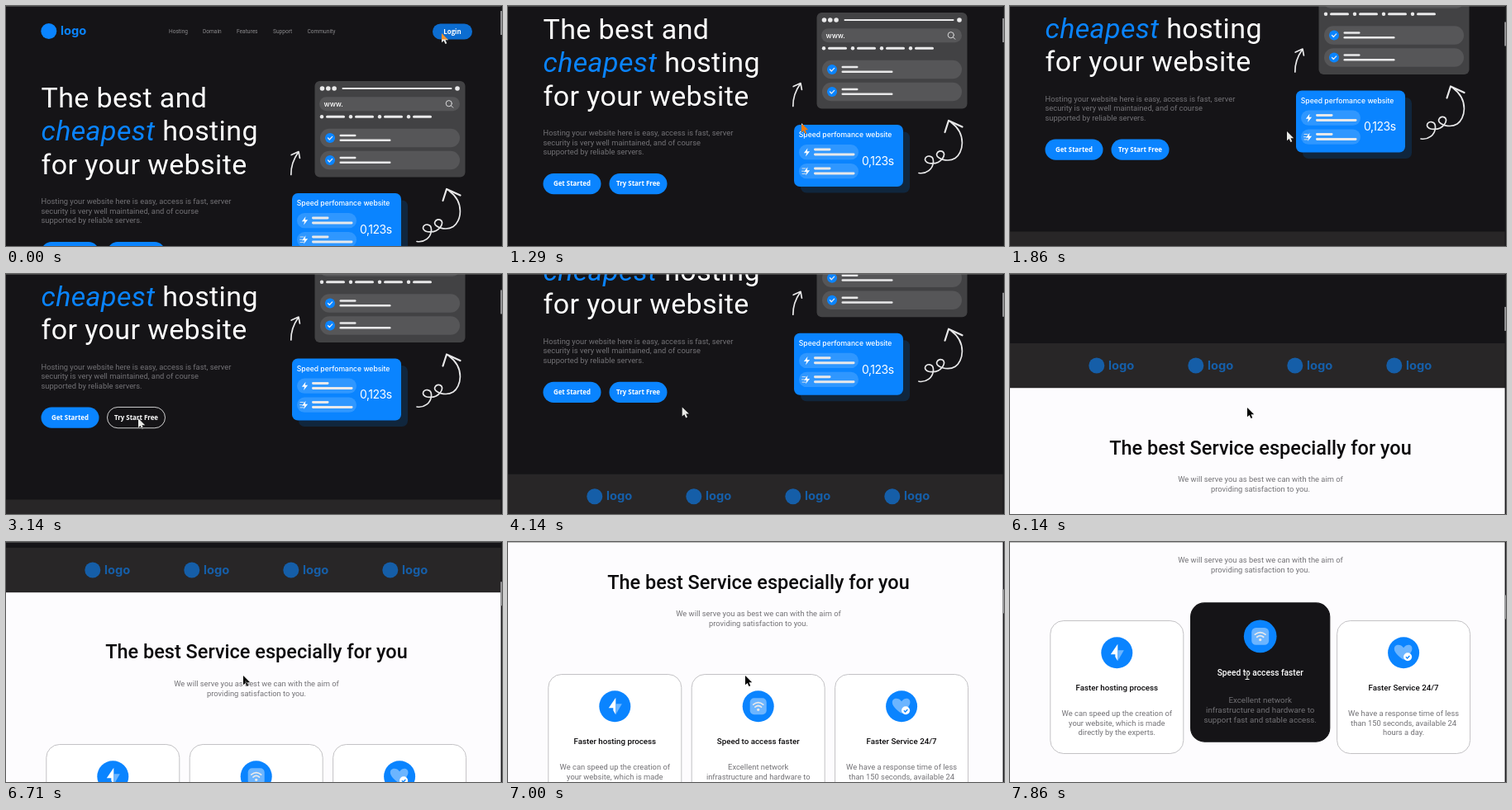
Write an HTML page that moves like this. It is 600x291 px and loops after 8000 ms.

```html
<!DOCTYPE html>
<html lang="en">
<head>
<meta charset="utf-8">
<title>Hosting landing page</title>
<style>
  html, body { margin: 0; width: 100%; height: 100%; overflow: hidden; background: #151417; }
  svg { display: block; width: 100%; height: 100%; isolation: isolate; }
  text { font-family: Roboto, sans-serif; }
  .nav { font-size: 6.6px; fill: #8b8a8d; }
  .hero { font-size: 34px; letter-spacing: .4px; fill: #fff; }
  .hero tspan { fill: #0a84ff; font-style: italic; }
  .body { font-size: 9.35px; fill: #737276; }
  .btn { font: 700 7.9px "Open Sans", sans-serif; fill: #fff; }
  .brand { font: 700 14.7px Inter, sans-serif; fill: #0a84ff; }
  .head { font-size: 23.5px; font-weight: 500; fill: #0b0a0c; }
  .card { font-size: 9.75px; font-weight: 500; fill: #0b0a0c; }
  .label { font: 500 8.6px Inter, sans-serif; fill: #fff; }
  .speed { font: 14px Inter, sans-serif; letter-spacing: -.5px; fill: #fff; }
  .mid { text-anchor: middle; }
  .line { fill: none; stroke: #e9e9ea; stroke-linecap: round; stroke-linejoin: round; }
  #cursor { mix-blend-mode: difference; fill: #fff; }
  #beam { fill: none; stroke: #fff; }
</style>
</head>
<body>
<svg viewBox="0 0 600 291" preserveAspectRatio="none">
  <g id="page"></g>
  <rect width="600" height="1" fill="#777" opacity=".5"/>
  <rect x="598.6" width="1.4" height="291" fill="#1b1a1d"/>
  <rect id="thumb" x="598.2" width="1.8" height="29" fill="#9a9a9c"/>
  <g id="cursor">
    <path id="arrow" d="M0 0V11.2L2.6 8.9L4.5 13L6.3 12.2L4.5 8.2H8.2Z"/>
    <path id="beam" d="M-2.5 -4.5H2.5M0 -4V4M-2.5 4.5H2.5"/>
  </g>
</svg>
<script>
const BLUE = '#0a84ff', PALE = '#6cb5ff', GREY = '#565658';
const $ = id => document.getElementById(id);

const text = (x, y, cls, str) => `<text x="${x}" y="${y}" class="${cls}">${str}</text>`;
const lines = (x, y, pitch, cls, rows) => rows.map((s, i) => text(x, y + i * pitch, cls, s)).join('');
const box = (x, y, w, h, r, fill, more = '') =>
  `<rect x="${x}" y="${y}" width="${w}" height="${h}" rx="${r}" fill="${fill}" ${more}/>`;
const pill = (x, y, w, h, fill, more) => box(x, y - h / 2, w, h, h / 2, fill, more);
const dot = (x, y, r, fill = '#e9e9ea') => `<circle cx="${x}" cy="${y}" r="${r}" fill="${fill}"/>`;
const line = (d, w) => `<path class="line" d="${d}" stroke-width="${w}"/>`;
const bar = (x, y, w, h) => pill(x, y, w, h, '#e9e9ea');
const shape = (d, fill) => `<path d="${d}" fill="${fill}"/>`;
const repeat = (n, x, gap, draw) => Array.from({ length: n }, (_, i) => draw(x + i * gap)).join('');
const brand = (x, y) => dot(x + 9.8, y, 9.5, BLUE) + text(x + 24, y + 4.6, 'brand', 'logo');

const button = (id, x, y, w, h, label) =>
  pill(x, y, w, h, BLUE, `id="${id}" stroke="#fff" stroke-width=".8" stroke-opacity="0"`) +
  text(x + w / 2, y + 2.8, 'btn mid', label);

function header() {
  const items = { Hosting: 197, Domain: 238, Features: 279, Support: 323, Community: 364.5 };
  return brand(42, 30.5) + Object.entries(items).map(([s, x]) => text(x, 33.2, 'nav', s)).join('') +
    button('login', 516, 31, 48, 19.2, 'Login');
}

function hero() {
  return lines(42.5, 123, 40.3, 'hero', [
      'The best and', '<tspan>cheapest</tspan> hosting', 'for your website']) +
    lines(42.5, 240.2, 11.55, 'body', [
      'Hosting your website here is easy, access is fast, server',
      'security is very well maintained, and of course',
      'supported by reliable servers.']) +
    button('get', 42.5, 298.6, 70, 25.3, 'Get Started') +
    button('try', 122.5, 298.6, 70, 25.3, 'Try Start Free');
}

function browser() {
  const tab = x => dot(x, 134.2, 2.2) + bar(x + 5, 134.2, 23, 3);
  const row = y => pill(380, y, 169, 22.5, GREY) + dot(392, y, 6, BLUE) +
    line(`M389.5 ${y}l1.8 2l3.4 -3.6`, 1.3) + bar(403.5, y - 3, 20, 2.5) + bar(403.5, y + 2.8, 62, 2.5);
  return box(373.5, 91, 182, 116.5, 6, '#424244') +
    repeat(3, 382.5, 7.3, x => dot(x, 100, 2.8)) + bar(406.5, 100, 133, 1.8) + dot(546, 100, 2.8) +
    pill(379, 118.8, 170, 17, GREY) + text(384.5, 121.7, 'label', 'www.') +
    line('M539.4 118.2a3.6 3.6 0 1 1 -7.2 0a3.6 3.6 0 1 1 7.2 0m-1 2.6l2.4 2.4', .9) +
    repeat(4, 382, 35, tab) + repeat(2, 160, 27, row);
}

function speedCard() {
  const row = y => pill(352, y, 72, 18.3, '#2f97ff') +
    bar(370, y - 3.2, 20.5, 2.8) + bar(370, y + 2.8, 49.5, 2.8) +
    shape(`M362.5 ${y - 5}l-4.6 6h3.2l-1 4.4l5 -6.4h-3.3z`, '#fff');
  return box(354, 235.5, 132, 74, 7, '#10263d') + box(346, 227, 132, 75, 7, BLUE) +
    text(351.8, 242.3, 'label', 'Speed perfomance website') +
    repeat(2, 260.2, 23, row) + line('M356 280h4m-4.5 3.2h2.5m-2 3.2h4', .9) +
    text(428, 275.8, 'speed', '0,123s');
}

const doodles = () =>
  line('M344.8 204.5Q344.6 190 353.5 177.5M345.2 180.6L354 176.6L355.4 184.4', 1.7) +
  line('M497 285.5C506 287 514 281 514.5 272S505 263.5 504.5 269S519 277 525.5 268' +
    'S521 256 518.8 262S532 273 541 267.5S556 239 536 224', 1.7) +
  line('M528.5 236L533 222L549.5 229.5', 2.2);

const strip = () => box(0, 398, 600, 54.2, 0, '#282627') +
  `<g opacity=".6">${repeat(4, 95, 120, x => brand(x, 425))}</g>`;

const glyphs = [
  shape('M1 -10.5L-7.5 2H-2V5L1 10Z', '#fff') + shape('M1 -3H8.5L1 10Z', PALE),
  box(-10, -10, 20, 20, 5, PALE) + line('M-6 -2.2Q0 -7 6 -2.2M-3.8 .8Q0 -2.4 3.8 .8', 1.7) + dot(0, 4, 1.6),
  shape('M0 8.5C-22 -6 -6 -15 0 -6C6 -15 20 -6 0 8.5Z', PALE) + dot(5, 5, 5, '#fff') +
    `<path d="M2.8 5l1.7 1.7l2.8 -3" fill="none" stroke="${BLUE}" stroke-width="1.3"/>`
];

function card(i, title, rows) {
  const x = 129.3 + i * 173.4;
  return `<g id="card${i}">` + box(x - 80.5, 636.5, 161, 161, 16, '#fff', 'stroke="#c3c2c5"') +
    dot(x, 675.3, 19, BLUE) + `<g transform="translate(${x} 675.3)">${glyphs[i]}</g>` +
    text(x, 721.3, 'card mid', title) + lines(x, 752.3, 11.55, 'body mid', rows) + '</g>';
}

function services() {
  return box(0, 452.2, 600, 500, 0, '#fdfcfe') +
    text(303, 532.5, 'head mid', 'The best Service especially for you') +
    lines(303, 566.2, 11.55, 'body mid', [
      'We will serve you as best we can with the aim of', 'providing satisfaction to you.']) +
    card(0, 'Faster hosting process', [
      'We can speed up the creation of', 'your website, which is made', 'directly by the experts.']) +
    card(2, 'Faster Service 24/7', [
      'We have a response time of less', 'than 150 seconds, available 24', 'hours a day.']) +
    card(1, 'Speed to access faster', [
      'Excellent network', 'infrastructure and hardware to', 'support fast and stable access.']);
}

$('page').innerHTML = box(0, 0, 600, 400, 0, '#151417') + header() + hero() + browser() +
  speedCard() + doodles() + strip() + services();

// Each step is a time followed by the values reached then.
const scrollSteps = [[0, 0], [710, 0], [1140, 83], [1430, 83], [1860, 124.5], [3710, 124.5],
  [4290, 166], [5710, 166], [6140, 314], [6290, 332], [6570, 350], [7000, 476], [7290, 541]];
const cursorSteps = [[0, 527, 33], [290, 524, 36], [710, 370, 135], [1140, 355, 142], [1290, 355, 142],
  [1860, 335, 152], [2710, 82, 176], [3140, 160, 175], [3710, 164, 174], [4290, 227, 157],
  [5710, 227, 157], [6140, 287, 162]];
const hoverSteps = {
  login: [[0, .2], [290, 1], [570, 0]],
  get: [[2430, 0], [2710, 1], [2860, 1], [3000, 0]],
  try: [[2860, 0], [3140, 1], [3710, 1], [4000, 0]]
};
const liftSteps = [[7140, 0], [7570, 1]];

function at(steps, t) {
  const n = steps.findIndex(s => s[0] > t);
  if (n < 1) return (n ? steps[steps.length - 1] : steps[0]).slice(1);
  const a = steps[n - 1], b = steps[n];
  const k = (t - a[0]) / (b[0] - a[0]);
  return a.map((v, i) => v + (b[i] - v) * k).slice(1);
}

const mix = (from, to, k) => `color-mix(in srgb, ${to} ${k * 100}%, ${from})`;
const cardBox = $('card1').querySelector('rect'), cardTitle = $('card1').querySelector('.card');

function draw(t) {
  const [scroll] = at(scrollSteps, t), [x, y] = at(cursorSteps, t), [lift] = at(liftSteps, t);
  $('page').setAttribute('transform', `translate(0 ${-scroll})`);
  $('thumb').setAttribute('y', 6 + scroll * .108);
  for (const id in hoverSteps) {
    const [k] = at(hoverSteps[id], t);
    $(id).setAttribute('fill-opacity', 1 - k);
    $(id).setAttribute('stroke-opacity', Math.max(0, k * 1.25 - .25));
  }
  $('card1').setAttribute('transform',
    `translate(302.7 ${717 - 18 * lift}) scale(${1 + .045 * lift}) translate(-302.7 -717)`);
  cardBox.style.fill = mix('#fff', '#151417', lift);
  cardBox.style.stroke = mix('#c3c2c5', '#151417', lift);
  cardTitle.style.fill = mix('#0b0a0c', '#fff', lift);
  $('cursor').setAttribute('transform', `translate(${x} ${y})`);
  $('arrow').style.display = lift > .5 ? 'none' : '';
  $('beam').style.display = lift > .5 ? '' : 'none';
}

// The picture advances seven times a second, on times rounded to 10 ms.
function tick() {
  const i = Math.floor((performance.now() % 8000 + 4.5) * 7 / 1000) % 56;
  draw(Math.round(i * 100 / 7) * 10);
  requestAnimationFrame(tick);
}
tick();
</script>
</body>
</html>
```
